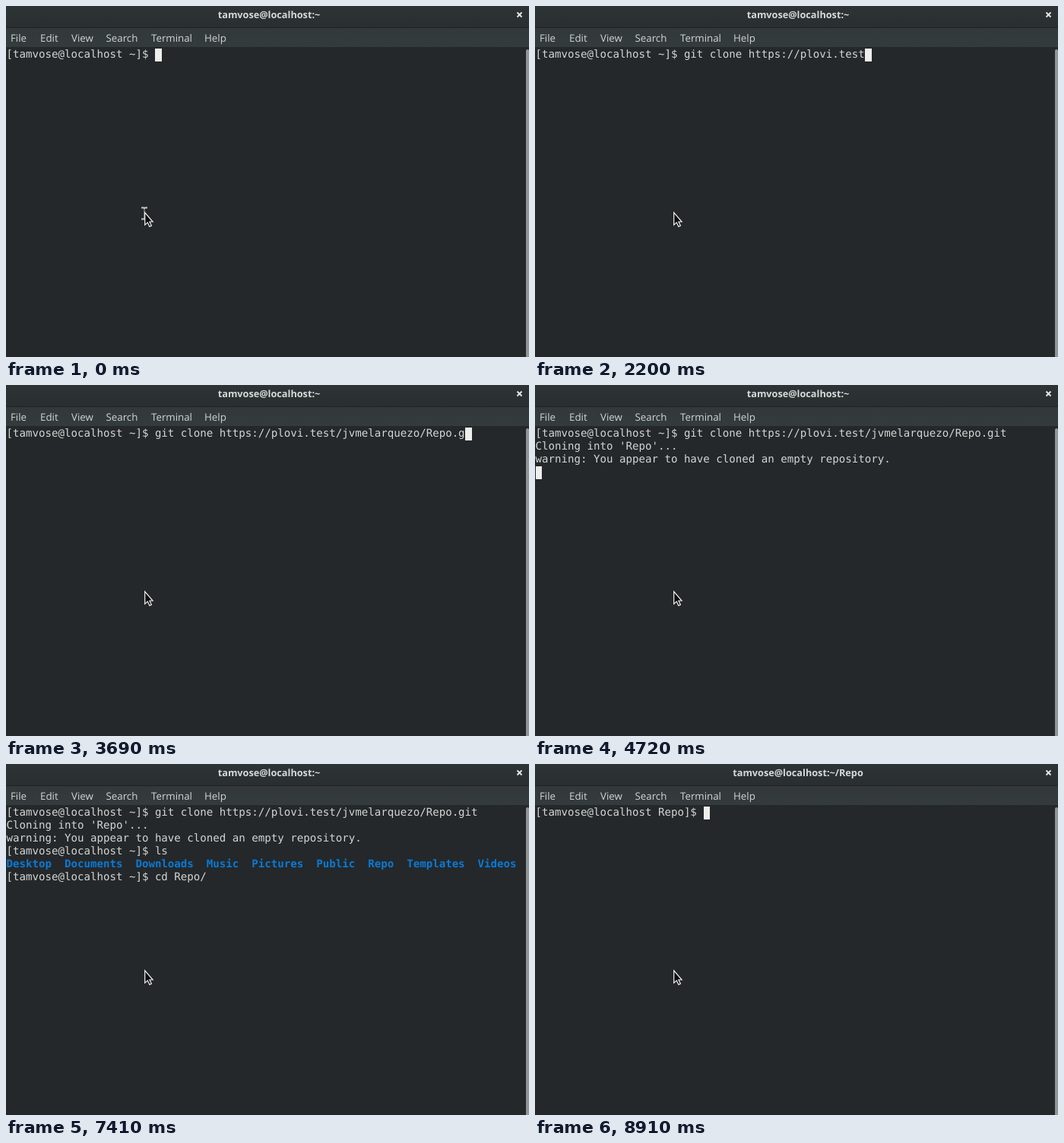
Animation of 688 by 462 pixels, one loop 9140 ms. Source, as an HTML page:

```html
<!DOCTYPE html>
<html lang="en">
<head>
<meta charset="utf-8">
<title>Terminal</title>
<style>
  html, body { margin: 0; width: 100%; height: 100%; overflow: hidden; background: #24282a; }
  #stage {
    position: relative; width: 688px; height: 462px; overflow: hidden;
    background: #24282a; text-rendering: geometricPrecision;
  }
  #stage * { position: absolute; white-space: pre; }
  .bar { left: 0; width: 100%; font-family: "Open Sans", "Noto Sans", sans-serif; }
  #head { top: 0; height: 29px; background: linear-gradient(#2e3436, #292e30); border-bottom: 1px solid #1f2325; box-sizing: border-box; }
  #title { left: 0; width: 692px; top: 1px; line-height: 20px; text-align: center; font-size: 12.7px; font-weight: 700; color: #d6d9d8; }
  #menu { top: 29px; height: 25px; background: linear-gradient(#33393b, #343b3d); font-size: 13.3px; line-height: 26px; color: #d2d5d4; }
  #menu span { top: 0; }
  .line {
    left: .5px; height: 17px; line-height: 17px; color: #d3d6d4;
    font-family: "DejaVu Sans Mono", monospace; font-size: 14.12px;
  }
  .dir { color: #0a7ad6; font-weight: 700; }
  #cursor { width: 8.5px; height: 17px; background: #eeeeec; }
  #scroll { left: 684px; top: 57px; width: 4px; height: 405px; border-radius: 2px 2px 0 0; background: #929596; }
  svg { left: 0; top: 0; }
</style>
</head>
<body>
<div id="stage">
  <div id="head" class="bar"><div id="title"></div></div>
  <div id="menu" class="bar">
    <span style="left:6px">File</span>
    <span style="left:45px">Edit</span>
    <span style="left:86px">View</span>
    <span style="left:131.5px">Search</span>
    <span style="left:191px">Terminal</span>
    <span style="left:261px">Help</span>
  </div>
  <div id="cursor"></div>
  <div id="scroll"></div>
  <svg width="688" height="462" fill="none">
    <path d="M672.5 8.5l6 6m0-6l-6 6" stroke="#e4e6e5" stroke-width="1.9"/>
    <g id="beam">
      <path d="M178 265.5h3l1 1 1-1h3M182 266v14M178 280.5h3l1-1 1 1h3" stroke="#c4c7c6" stroke-width="2"/>
      <path d="M182 267v12" stroke="#17191a"/>
    </g>
    <path d="M182.7 271.8v16.4l3.6-3.3 2.6 5.5 2.5-1.2-2.5-5.2h4.2z" fill="#0c0e0f" stroke="#f2f3f2" stroke-width="1.2"/>
  </svg>
</div>
<script>
const LOOP = 9140, CELL = 8.5, ROW = 17, TOP = 56;
const USER = "tamvose@localhost";
const HOME = `[${USER} ~]$ `, REPO = `[${USER} Repo]$ `;
const FOLDERS = "Desktop  Documents  Downloads  Music  Pictures  Public  Repo  Templates  Videos";
const clone = "git clone https://plovi.test/jvmelarquezo/Repo.git";

const cues = [];
let text = "";
const put = (at, add, caret = true) => {
  text += add;
  cues.push({ at, text, caret });
};
// Types one character per step, evenly from the first time to the last.
const type = (from, to, chars) =>
  [...chars].forEach((c, i) => put(from + (to - from) * i / (chars.length - 1), c));

put(0, HOME);
type(90, 940, clone.slice(0, 12));
type(1030, 1890, clone.slice(12, 24));
type(1970, 2200, clone.slice(24, 28));
type(2290, 2840, clone.slice(28, 37));
type(2920, 3690, clone.slice(37, 48));
type(3780, 3860, clone.slice(48));
put(4170, "\nCloning into 'Repo'...\n");
put(4720, "warning: You appear to have cloned an empty repository.\n");
put(4790, HOME);
type(5880, 5960, "ls");
put(6120, `\n${FOLDERS}\n${HOME}`);
type(6890, 7185, "cd Re");
put(7260, "po/");
put(7410, "", false);
put(7490, `\n${REPO}`);
type(7720, 7800, "ls");
put(8030, `\n${REPO}`);
type(8180, 8620, "clear");
text = "";
put(8910, REPO);

const $ = id => document.getElementById(id);
const stage = $("stage"), title = $("title"), cursor = $("cursor"), beam = $("beam");
const rows = Array.from({ length: 8 }, (_, i) => {
  const row = document.createElement("div");
  row.style.top = TOP + ROW * i + "px";
  stage.insertBefore(row, cursor);
  return row;
});

let shown;
function draw(now) {
  const t = now % LOOP;
  const cue = cues.findLast(c => c.at <= t + 0.01);
  if (cue !== shown) {
    shown = cue;
    const lines = cue.text.split("\n"), last = lines.length - 1;
    rows.forEach((row, i) => {
      row.textContent = lines[i] || "";
      row.className = lines[i] === FOLDERS ? "line dir" : "line";
    });
    cursor.style.left = 0.5 + CELL * lines[last].length + "px";
    cursor.style.top = TOP + ROW * last + "px";
    cursor.style.visibility = cue.caret ? "visible" : "hidden";
    title.textContent = USER + (t < 7490 ? ":~" : ":~/Repo");
    beam.style.display = t < 90 ? "" : "none";
  }
}

const start = performance.now();
function tick() {
  draw(performance.now() - start);
  requestAnimationFrame(tick);
}
tick();
</script>
</body>
</html>
```
